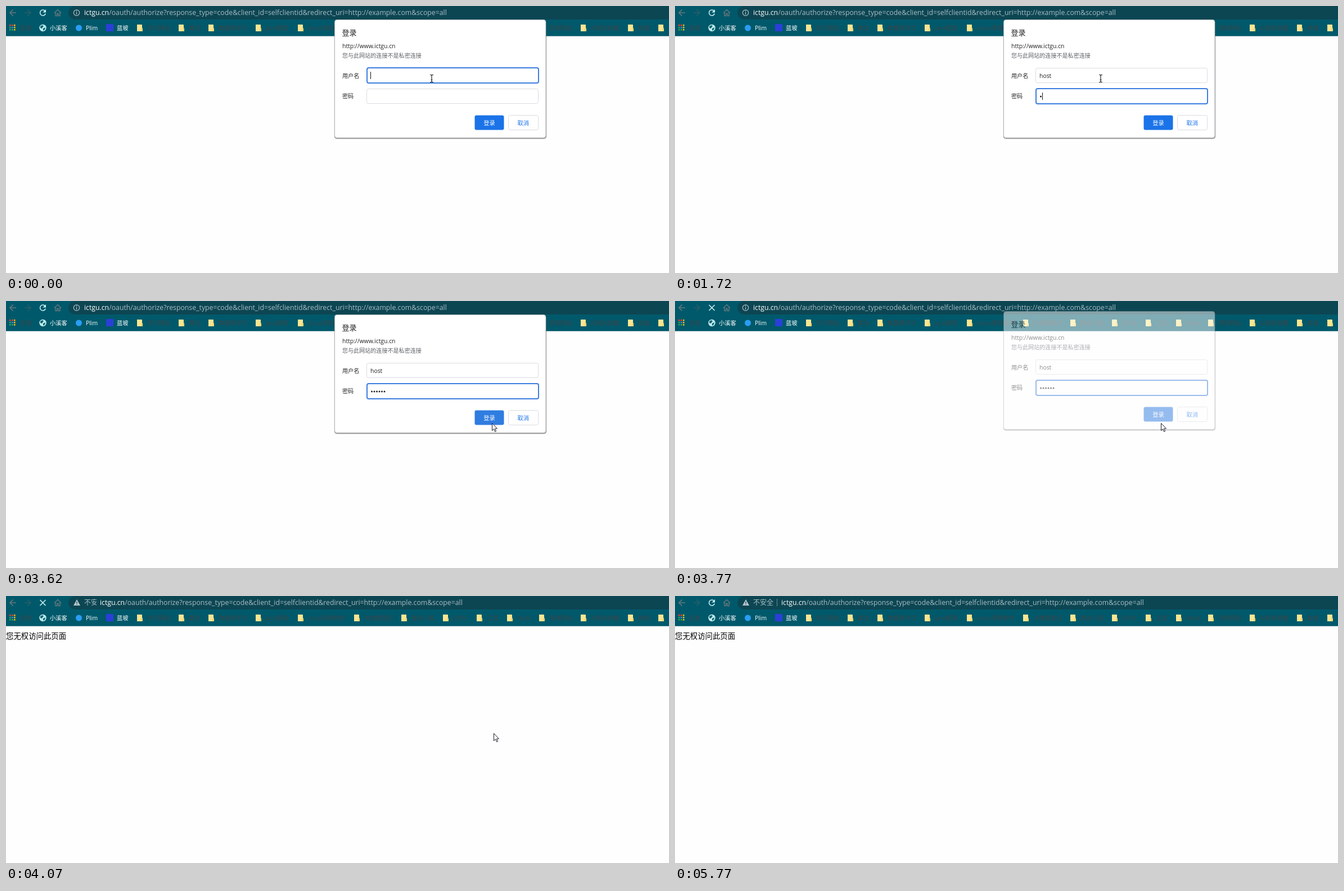
Write an HTML page that moves like this. It is 1179 by 475 pixels and loops after 6480 ms.

```html
<!DOCTYPE html>
<html lang="zh-CN">
<head>
<meta charset="utf-8">
<title>登录</title>
<style>
  html, body { margin: 0; width: 100%; height: 100%; overflow: hidden; background: #fefefe; }
  svg { display: block; width: 1179px; height: 475px; }
  text { font: 10.3px "Open Sans", "Noto Sans CJK SC", "Noto Sans CJK", sans-serif; fill: #222; white-space: pre; }
  .url { font-size: 12.27px; fill: #a8bdc3; }
  .url tspan, .mark { fill: #fff; }
  .mark { font-weight: 500; }
  .dim { fill: #3a444a; }
  .line { fill: none; stroke-width: 1.6; }
  .field { fill: #fff; stroke: #dadce0; }
  .field.focus { stroke: #3c7de0; stroke-width: 2; height: 27px; transform: translate(.5px, -.5px); }
</style>
</head>
<body>
<svg viewBox="0 0 1179 475">
  <defs>
    <clipPath id="chipClip"><rect id="chipBox" x="139" y="0" height="24"/></clipPath>
    <g id="folder">
      <path d="M0 33h8q1 0 1 1v11H0z" fill="#fde592"/>
      <path d="M7 39h2q1 0 1 1v5H7z" fill="#f6d673"/>
    </g>
  </defs>

  <rect width="1179" height="53" fill="#00596b"/>
  <rect y="53" width="1179" height="1" fill="#5c8f9a"/>
  <path d="M1179 0H123a12 12 0 0 0 0 24h1056z" fill="#0d4653"/>

  <!-- navigation buttons -->
  <path class="line" stroke="#68777c" d="M18 12H7m5.500-5.500L7 12l5.500 5.500"/>
  <path class="line" stroke="#2b5d69" d="M33 12h11m-5.500-5.500L44 12l-5.500 5.500"/>
  <g id="reload">
    <path class="line" stroke="#c9f2f4" d="M69.500 9a5 5 0 1 0 .8 4.500"/>
    <path fill="#c9f2f4" d="M71 6v5.500h-5.500z"/>
  </g>
  <path id="stop" class="line" stroke="#c9f2f4" d="M60.500 7l10 10m0-10l-10 10"/>
  <path class="line" stroke="#68777c" style="stroke-width:1.400" d="M86 12.500l6-6 6 6M88 11.500v6h2.800v-4h2.400v4H96v-6"/>

  <!-- address -->
  <g id="info" class="line" stroke="#b5c5ca">
    <circle cx="125.500" cy="12" r="5.200" stroke-width="1.200"/>
    <path d="M125.500 11v4m0-6.500v1.400" stroke-width="1.300"/>
  </g>
  <g id="warn">
    <path d="M126 6l6 11h-12z" fill="#b5c5ca"/>
    <path d="M126 10v3.200m0 1v1.400" stroke="#0d4653" stroke-width="1.300"/>
  </g>
  <g clip-path="url(#chipClip)">
    <text class="url" style="font-size:12px" x="139" y="16.300">不安全</text>
    <path d="M181.500 5v13" stroke="#6d8b93"/>
  </g>
  <text id="url" class="url" y="16"><tspan>ictgu.cn</tspan>/oauth/authorize?response_type=code&amp;client_id=selfclientid&amp;redirect_uri=http://example.com&amp;scope=all</text>

  <!-- bookmarks -->
  <g id="apps"></g>
  <text class="dim" x="25" y="43">应用</text>
  <circle cx="65.500" cy="39" r="6.200" fill="#c2edee"/>
  <path d="M61 36l4-2 2 2-2 2-1 2-3-1zM66 40l4-2-1 4-3 2z" fill="#0a6676"/>
  <text class="mark" x="78" y="43">小溪客</text>
  <circle cx="129.500" cy="39" r="5.500" fill="#2a9df4"/>
  <text class="mark" x="142" y="43">Plim</text>
  <rect x="178" y="32" width="13" height="13" fill="#2b3fd8"/>
  <text class="mark" x="197" y="43">蓝坡</text>
  <g id="folders"></g>

  <text id="denied" x="0" y="75.600" style="font-size:13.400px;fill:#000">您无权访问此页面</text>

  <g id="dialog">
    <rect x="583.500" y="24" width="378" height="213" rx="5" fill="#000" opacity=".16"/>
    <rect x="584" y="25" width="377" height="211" rx="4.500" fill="#000" opacity=".3"/>
    <rect x="584.500" y="24.500" width="375.500" height="210" rx="4" fill="#fff" stroke="#b4b8ba"/>
    <text x="597.500" y="52" style="font-size:13px">登录</text>
    <text x="598" y="75" style="font-size:10.400px">http://www.ictgu.cn</text>
    <text x="598" y="92" style="font-size:10.070px;fill:#5f6368">您与此网站的连接不是私密连接</text>
    <text x="598" y="127.600" style="font-size:10.100px">用户名</text>
    <text x="598" y="164.300" style="font-size:10.100px">密码</text>
    <rect id="field0" class="field" x="641.500" y="110.500" width="305" height="26" rx="3"/>
    <rect id="field1" class="field" x="641.500" y="147.500" width="305" height="26" rx="3"/>
    <text id="login" x="648" y="127.800" style="font-size:10.400px"></text>
    <path id="dots" fill="none" stroke="#222" stroke-width="3" stroke-linecap="round" stroke-dasharray="0 4.500"/>
    <rect id="caret" width="1" height="13" fill="#111"/>
    <rect id="submit" x="833.500" y="194.500" width="52" height="26" rx="3"/>
    <text x="849.200" y="211.500" style="fill:#fff">登录</text>
    <rect class="field" x="893.500" y="194.500" width="53" height="26" rx="3"/>
    <text x="909.500" y="211.500" style="fill:#1a73e8">取消</text>
  </g>

  <path id="beam" fill="none" stroke="#222" stroke-width="1.200" d="M-3-6.500h2l1 1 1-1h2M0-5.500v11M-3 6.500h2l1-1 1 1h2M-1.500 2.500h3"/>
  <path id="arrow" fill="#fff" stroke="#1c1c2c" d="M.5.5v13l3-2.800 2.100 4.800 2-.9-2.100-4.600h4z"/>
</svg>
<script>
const $ = id => document.getElementById(id);
const LOOP = 6480, NAME = 'host';

const labels = ['学习网站', '算法', '数据库学习', 'Java框架', 'Linux常用软件', '大数据笔记', '面试八股',
  'JSON', '工具', 'Redis', '常用网站', 'AI相关收藏', '前端', ''];
const lefts = [233, 307, 360, 444, 519, 619, 703, 777, 837, 891, 948, 1022, 1106, 1160];
$('folders').innerHTML = labels.map((label, i) =>
  `<use href="#folder" x="${lefts[i]}"/><text class="dim" x="${lefts[i] + 18}" y="43">${label}</text>`).join('');

const hues = { r: '#ea4335', y: '#fbbc05', g: '#34a853', b: '#4285f4' };
$('apps').innerHTML = [...'rrygbyggy'].map((hue, i) => {
  const col = i % 3, row = (i - col) / 3;
  return `<rect x="${6 + col * 4}" y="${33 + row * 4}" width="2.6" height="2.6" fill="${hues[hue]}"/>`;
}).join('');

// Each entry changes part of the state from its time on.
const steps = [
  [0, { typed: 0, dots: 0, field: 0, caret: 1, hover: 0, fade: 1, lift: 0, loading: 0, chip: 0, shift: 0, done: 0, cursor: ['beam', 757, 129] }],
  [280, { caret: 0 }],
  [430, { typed: 2, caret: 1 }],
  [550, { typed: 3 }],
  [700, { typed: 4 }],
  [1110, { caret: 0 }],
  [1260, { field: 1, caret: 1 }],
  [1720, { dots: 1 }],
  [1870, { dots: 2 }],
  [1990, { dots: 3 }],
  [2260, { dots: 4 }],
  [2540, { dots: 5 }],
  [2660, { dots: 6 }],
  [3220, { caret: 0, cursor: ['beam', 790, 158] }],
  [3340, { cursor: ['arrow', 843, 190] }],
  [3490, { hover: 1, cursor: ['arrow', 862, 214] }],
  [3620, { cursor: ['arrow', 864, 217] }],
  [3770, { fade: .5, lift: -6, loading: 1 }],
  [3920, { fade: 0 }],
  [4070, { done: 1, chip: 22, shift: 28, cursor: ['arrow', 867, 244] }],
  [4220, { chip: 50, shift: 50, cursor: ['arrow', 867, 245] }],
  [4500, { loading: 0 }],
  [5500, { cursor: ['arrow', 1094, 385] }],
  [5650, { cursor: ['arrow', 1127, 456] }],
  [5770, { cursor: ['none', 0, 0] }]
];

const show = (id, on) => $(id).setAttribute('visibility', on ? 'visible' : 'hidden');
const set = (id, attrs) => { for (const k in attrs) $(id).setAttribute(k, attrs[k]); };

function draw(t) {
  const s = Object.assign({}, ...steps.filter(([at]) => at <= t).map(([, change]) => change));
  const [kind, x, y] = s.cursor;

  $('login').textContent = NAME.slice(0, s.typed);
  set('dots', { d: s.dots ? `M650.5 161h${(s.dots - 1) * 4.5 + .1}` : '' });
  const advance = s.field ? (s.dots && Math.round(s.dots * 4.4 + 1))
    : s.typed ? Math.floor($('login').getComputedTextLength()) : 0;
  set('caret', { x: 648 + advance, y: s.field ? 154 : 117, opacity: s.caret });
  for (const i of [0, 1]) $('field' + i).classList.toggle('focus', s.field === i);
  set('submit', { fill: s.hover ? '#2f7de1' : '#1a73e8' });
  set('dialog', { opacity: s.fade, transform: `translate(0 ${s.lift})` });

  show('reload', !s.loading);
  show('stop', s.loading);
  show('info', !s.done);
  show('warn', s.done);
  show('denied', s.done);
  set('chipBox', { width: s.chip });
  set('url', { x: 139 + s.shift });

  for (const id of ['beam', 'arrow']) {
    show(id, id === kind);
    set(id, { transform: `translate(${x} ${y})` });
  }
}

const start = performance.now();
function tick() {
  draw((performance.now() - start) % LOOP);
  requestAnimationFrame(tick);
}
tick();
</script>
</body>
</html>
```
